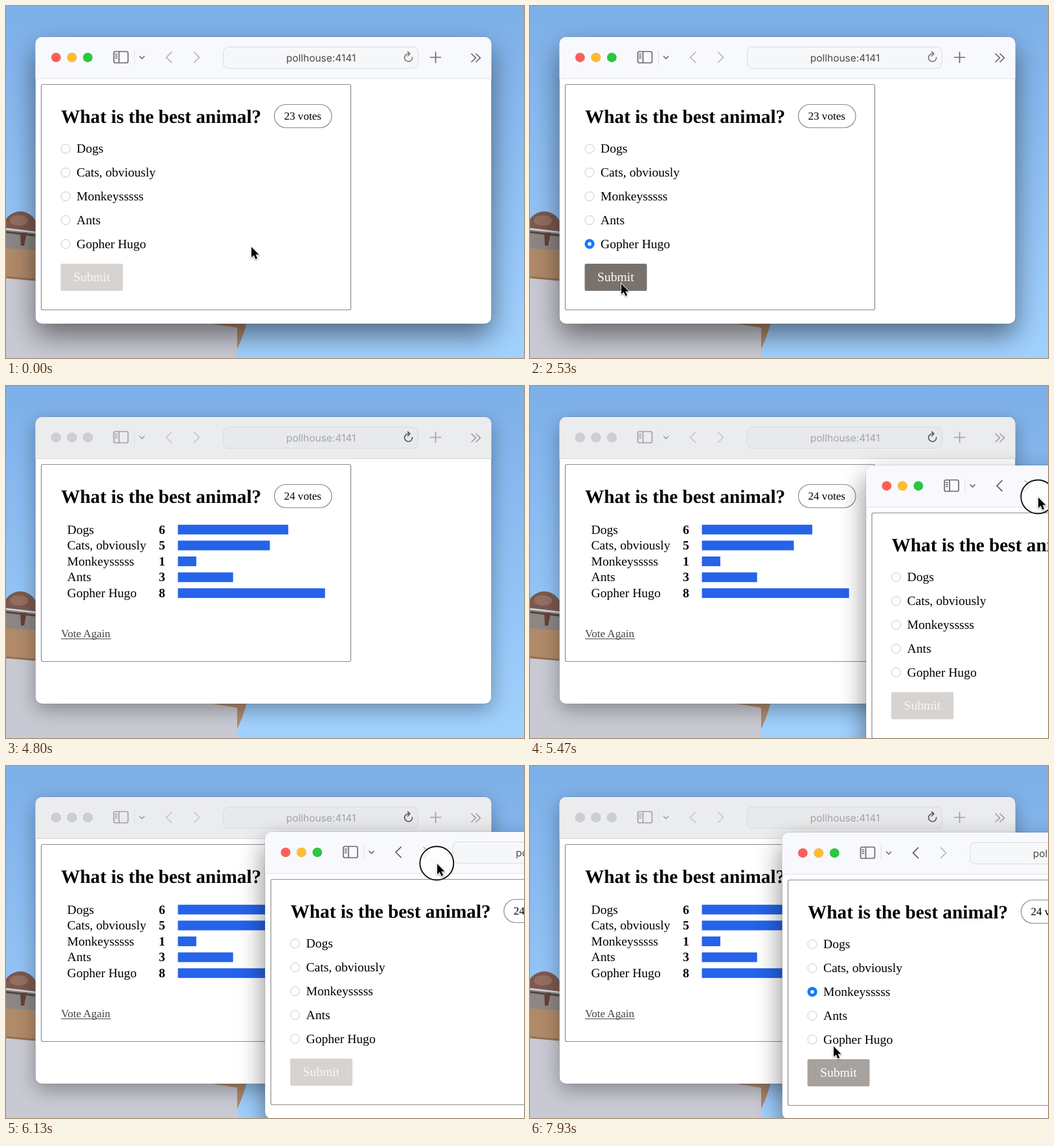
Animation of 800x545 px, one loop 8 s. Source, as an HTML page:

```html
<!DOCTYPE html>
<html lang="en">
<head>
<meta charset="utf-8">
<title>Poll</title>
<style>
  html, body { margin: 0; width: 100%; height: 100%; overflow: hidden; }
  svg { display: block; width: 800px; height: 545px; }
  text { font: 19.6px "Liberation Serif", "Times New Roman", serif; text-rendering: geometricPrecision; }
  .title { font-size: 29.3px; font-weight: bold; }
  .small { font-size: 17.1px; }
  .bold { font-weight: bold; }
  .url { font: 15.5px Inter, Roboto, sans-serif; text-anchor: middle; }
  .icon { fill: none; stroke-width: 1.7; stroke-linecap: round; stroke-linejoin: round; }
</style>
</head>
<body>
<svg viewBox="0 0 800 545">
  <defs>
    <linearGradient id="sky" x1="0" y1="0" x2="0" y2="1">
      <stop offset="0" stop-color="#7dafe8"/>
      <stop offset="1" stop-color="#a1d1fe"/>
    </linearGradient>
  </defs>
  <rect width="800" height="545" fill="url(#sky)"/>
  <g id="clipboard">
    <ellipse cx="22" cy="346" rx="27" ry="28" fill="#7b594e"/>
    <ellipse cx="20" cy="332" rx="14" ry="8" fill="#946f60"/>
    <path d="M0 374L45 379L372 489Q366 515 350 545H0Z" fill="#b08a69"/>
    <path d="M0 344L60 351V380L0 375Z" fill="#8c8784"/>
    <path d="M0 345L60 352" stroke="#d5d5d8" stroke-width="2.5"/>
    <path d="M0 350L60 357" stroke="#4d4746" stroke-width="3"/>
    <path d="M22 351h10l-4 20h-5Z" fill="#674039"/>
    <path d="M0 420L45 424L318 492L357 498V545H0Z" fill="#c9c9d3"/>
    <path d="M0 420L45 424" stroke="#94704f" stroke-width="3"/>
  </g>
  <g id="scene"></g>
</svg>
<script>
const FRAMES = 120, FRAME_MS = 8000 / FRAMES;
const options = ["Dogs", "Cats, obviously", "Monkeysssss", "Ants", "Gopher Hugo"];
const counts = [6, 5, 1, 3, 8];

// Keys are [frame, x, y]
const cursorKeys = [
  [1, 379, 373], [13, 325, 178], [14, 318, 176], [17, 98, 250], [21, 104, 372], [25, 146, 470],
  [27, 146, 470], [31, 91, 369], [33, 91, 369], [37, 141, 430], [57, 141, 430],
  [60, 408, 368], [63, 408, 368], [65, 690, 278]
];
const secondCursorKeys = [
  [100, 656, 152.5], [101, 684, 210], [103, 684, 210], [113, 436, 350], [117, 436, 350], [119, 469, 434]
];
const windowKeys = [
  [72, 830, 62], [77, 560, 70], [79, 560, 70], [82, 473.5, 75], [92, 354.5, 54], [97, 344, 55]
];

const linear = u => u;
const smooth = u => u * u * (3 - 2 * u);

function along(keys, k, ease) {
  const next = keys.findIndex(key => key[0] > k);
  if (next === 0) return keys[0].slice(1);
  if (next < 0) return keys.at(-1).slice(1);
  const [t0, x0, y0] = keys[next - 1], [t1, x1, y1] = keys[next];
  const u = ease((k - t0) / (t1 - t0));
  return [x0 + (x1 - x0) * u, y0 + (y1 - y0) * u];
}

const text = (x, y, s, cls = "", fill = "#000") =>
  `<text x="${x}" y="${y}" class="${cls}" fill="${fill}">${s}</text>`;
const box = (x, y, w, h, r, attrs) =>
  `<rect x="${x}" y="${y}" width="${w}" height="${h}" rx="${r}" ${attrs}/>`;
const icon = (d, stroke) => `<path class="icon" d="${d}" stroke="${stroke}"/>`;

function toolbar(active, canGoBack) {
  const dark = active ? "#69696b" : "#a0a1a3", pale = active ? "#b3b4b7" : "#c5c6c8";
  const lights = active ? ["#ff5f57", "#febc2e", "#28c840"] : Array(3).fill("#cdced0");
  return `<path d="M45.5 112.5V58a10 10 0 0 1 10-10H739.5a10 10 0 0 1 10 10V112.5Z"
      fill="${active ? "#f8f9fc" : "#ebecee"}"/>
    <path d="M45.5 112.5H749.5" stroke="${active ? "#e2e3e6" : "#d8d9db"}"/>` +
    lights.map((c, i) =>
      `<circle cx="${77.3 + i * 24.5}" cy="79.7" r="7.3" fill="${c}" stroke="#000" stroke-opacity=".1" stroke-width=".7"/>`).join("") +
    icon("M169 70.5H186a2.5 2.5 0 0 1 2.5 2.5V85.500a2.500 2.500 0 0 1-2.500 2.500H169a2.500 2.500 0 0 1-2.500-2.500V73a2.500 2.500 0 0 1 2.500-2.500ZM174.500 71V87.500M169 74.500h2.500M169 77.500h2.500M169 80.500h2.500", dark) +
    `<path d="M198.500 68V91" stroke="#dedfe1"/>` +
    icon("M206.500 78L210 81.500L213.500 78", dark) +
    icon("M255.500 71.500L247.500 79.500L255.500 87.500", canGoBack ? "#505053" : pale) +
    icon("M290.500 71.500L298.500 79.500L290.500 87.500", pale) +
    box(335.5, 63.5, 301, 33, 8, `fill="${active ? "#f6f7f9" : "#e8e9eb"}" stroke="${active ? "#dadbdd" : "#d8d9db"}"`) +
    text(486.5, 86, "pollhouse:4141", "url", active ? "#4b4b4d" : "#a4a5a7") +
    icon("M627.500 79.500A6 6 0 1 1 621.500 74H623.500M620.500 71L623.800 74L620.500 77.500", active ? "#77787a" : "#58595b") +
    icon("M655.500 79.500H671.500M663.500 71.500V87.500", dark) +
    icon("M719 74L725.500 80.300L719 86.500M726 74L732.500 80.300L726 86.500", dark);
}

function form(selected, hover) {
  const rows = options.map((name, i) => {
    const y = 221 + i * 36.85;
    const radio = i === selected
      ? `<circle cx="92" cy="${y}" r="7.6" fill="#0f7bff"/><circle cx="92" cy="${y}" r="2.8" fill="#fff"/>`
      : `<circle cx="92" cy="${y}" r="7" fill="#fff" stroke="#c9c9c9"/>`;
    return radio + text(109, y + 6.3, name);
  }).join("");
  const enabled = selected >= 0;
  const fill = !enabled ? "#d6d3d1" : hover ? "#78716c" : "#a8a29e";
  return rows + box(84.5, 399, 96, 42, 2, `fill="${fill}"`) +
    text(104, 426, "Submit", "", enabled ? "#fff" : "#f8f7f6");
}

function results() {
  return options.map((name, i) => {
    const y = 228.5 + i * 24.6;
    return text(94.5, y, name) + text(236, y, counts[i], "bold") +
      box(265.5, y - 13.7, counts[i] * 28.4, 15, 0, 'fill="#2563eb"');
  }).join("") + text(85, 389, "Vote Again", "small", "#444") +
    '<path d="M85 391.500H162" stroke="#444"/>';
}

function browser({ x = 0, y = 0, active, canGoBack, votes, voted, selected, hover }) {
  const shadow = active ? [18, 21, .48] : [9, 15, .32];
  return `<g transform="translate(${x} ${y})">` +
    box(45.5, 48 + shadow[0], 704, 444, 10, `style="filter:blur(${shadow[1]}px)" opacity="${shadow[2]}"`) +
    box(45.5, 48, 704, 444, 10, 'fill="#fff" stroke="#000" stroke-opacity=".16"') +
    toolbar(active, canGoBack) +
    box(54.5, 121.5, 478, voted ? 305 : 349, 2.5, 'fill="none" stroke="#8b8b8b" stroke-width="1.2"') +
    text(85, 181, "What is the best animal?", "title") +
    box(414.5, 152.5, 88.5, 36, 18, 'fill="#fff" stroke="#8b8b8b" stroke-width="1.2"') +
    text(429.5, 176, votes + " votes", "small") +
    (voted ? results() : form(selected, hover)) + "</g>";
}

function pointer([x, y], pressed) {
  const ring = pressed
    ? `<circle cx="${x - .7}" cy="${y - 1}" r="26" fill="#fff" fill-opacity=".65" stroke="#111" stroke-width="1.9"/>` : "";
  return ring + `<path transform="translate(${x} ${y})" d="M0 0V16.200L3.700 12.800L6.500 19L9.200 17.800L6.500 11.800H11.500Z"
    stroke="#fff" stroke-width="1.8" paint-order="stroke" style="filter:drop-shadow(0 1px 1px #0006)"/>`;
}

const overSubmit = (x, y) => x > 84 && x < 181 && y > 399 && y < 441;

function draw(k) {
  const voted = k >= 48, switched = k >= 72;
  const first = along(cursorKeys, k, smooth);
  let out = browser({
    active: !switched, voted, votes: voted ? 24 : 23,
    selected: k >= 32 ? 4 : -1, hover: overSubmit(...first)
  });
  if (!switched && k < 65) out += pointer(first);
  if (k > 72) {
    const [x, y] = along(windowKeys, k, linear);
    const dragging = k < 100;
    const tip = dragging ? [x + 311.5, y + 97.5] : along(secondCursorKeys, k, smooth);
    out += browser({
      x, y, active: true, canGoBack: true, votes: 24,
      selected: k >= 116 ? 2 : -1, hover: overSubmit(tip[0] - x, tip[1] - y)
    }) + pointer(tip, dragging);
  }
  return out;
}

const scene = document.getElementById("scene");
let shown = -1;
function tick() {
  const k = Math.floor((performance.now() + 4) / FRAME_MS) % FRAMES;
  if (k !== shown) scene.innerHTML = draw(shown = k);
  requestAnimationFrame(tick);
}
tick();
</script>
</body>
</html>
```
